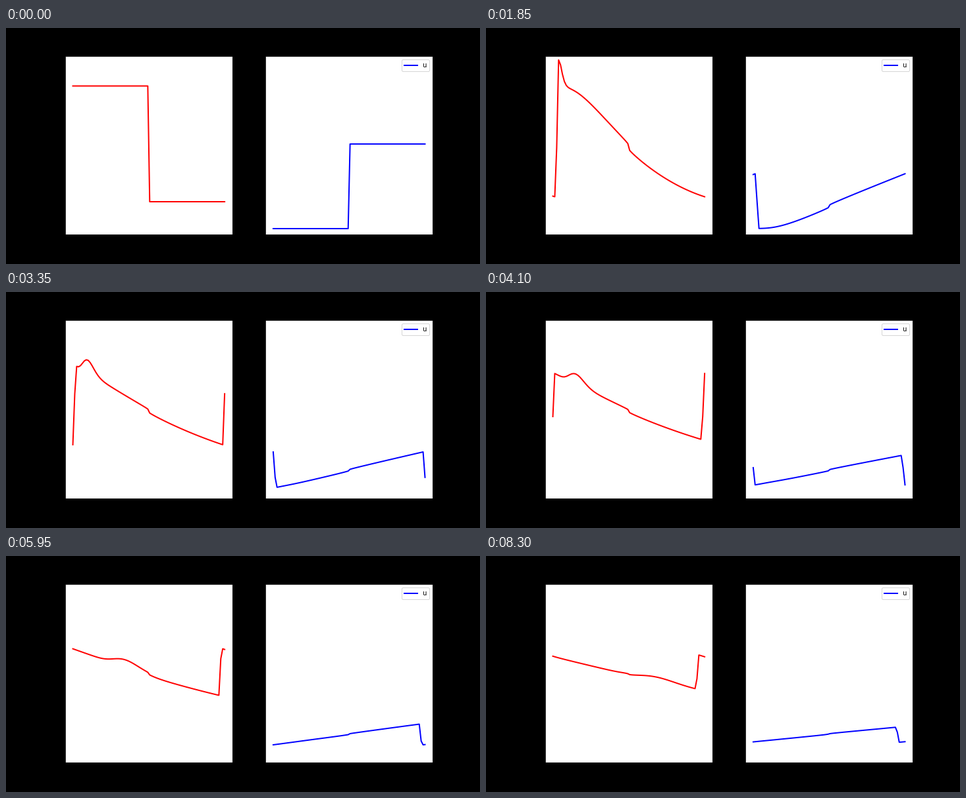
Recreate the animation shown at these times as a matplotlib script. Size 720 by 360 pixels, loop 8.35 s.

```python
import numpy as np
import matplotlib.pyplot as plt
from matplotlib.animation import FuncAnimation

# Aw-Rascle traffic flow with pressure p = C * sqrt(rho), Godunov scheme,
# periodic through one ghost cell at each end
CELLS = 80
FRAMES = 167
SUBSTEPS = 4
RATIO = 0.95  # dt / dx
C = 0.511
RHO_LEFT, RHO_RIGHT = 0.6695, 0.020
U_LEFT, U_RIGHT = 0.020, 0.495


def flow(rho, w):
    return rho * (w - C * np.sqrt(rho))


def velocity(rho, y):
    return y / rho - C * np.sqrt(rho)


def step(rho, y):
    w = (y / rho)[:-1]
    ahead = velocity(rho, y)[1:]
    middle = (np.maximum(w - ahead, 0) / C) ** 2
    sonic = (2 * w / (3 * C)) ** 2
    demand = flow(np.minimum(rho[:-1], sonic), w)
    supply = flow(np.maximum(middle, sonic), w)
    flux = np.minimum(demand, supply)

    rho, y = rho.copy(), y.copy()
    rho[1:-1] -= RATIO * np.diff(flux)
    y[1:-1] -= RATIO * np.diff(flux * w)
    for q in (rho, y):
        q[0], q[-1] = q[-2], q[1]
    return rho, y


def simulate():
    left = np.arange(CELLS) < CELLS // 2
    rho = np.where(left, RHO_LEFT, RHO_RIGHT)
    u = np.where(left, U_LEFT, U_RIGHT)
    y = rho * (u + C * np.sqrt(rho))
    states = []
    for _ in range(FRAMES):
        states.append((rho, velocity(rho, y)))
        for _ in range(SUBSTEPS):
            rho, y = step(rho, y)
    return states


states = simulate()
x = np.arange(CELLS)

fig, (ax_rho, ax_u) = plt.subplots(1, 2, figsize=(10, 5), dpi=72, facecolor="black")
fig.subplots_adjust(left=0.125, right=0.9, bottom=0.125, top=0.88, wspace=0.2)

rho_line, = ax_rho.plot(x, states[0][0], color="red", lw=2)
u_line, = ax_u.plot(x, states[0][1], color="blue", lw=2, label="u")
ax_rho.set_ylim(-0.164, 0.836)
ax_u.set_ylim(-0.013, 0.987)
ax_u.legend(loc="upper right")
for ax in (ax_rho, ax_u):
    ax.set_xlim(-0.05 * (CELLS - 1), 1.05 * (CELLS - 1))
    ax.set_xticks([])
    ax.set_yticks([])


def draw(i):
    rho, u = states[i]
    rho_line.set_ydata(rho)
    u_line.set_ydata(u)
    return rho_line, u_line


anim = FuncAnimation(fig, draw, frames=FRAMES, interval=50, repeat=True, repeat_delay=0)
plt.show()
```
